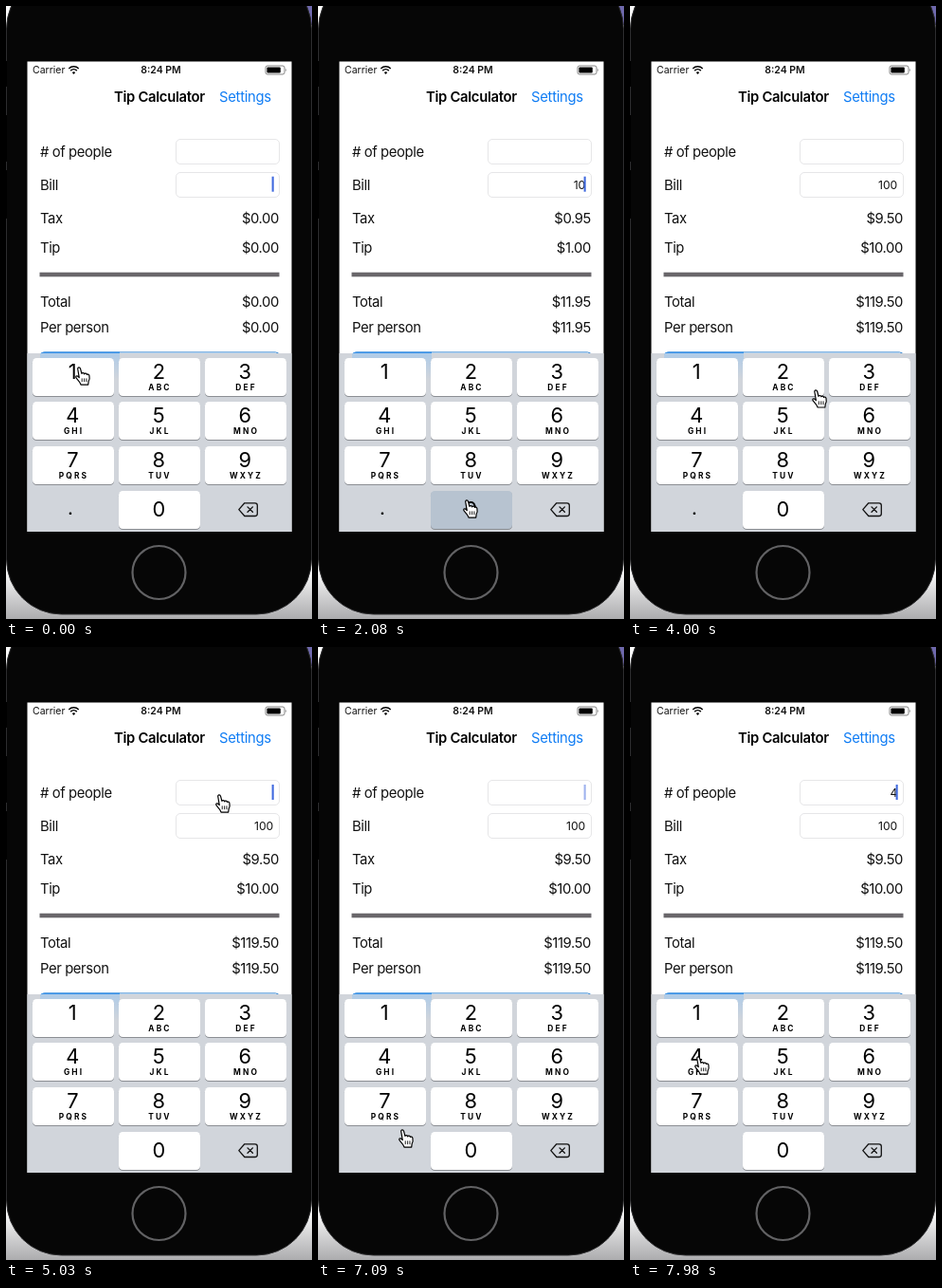
These frames come from a looping animation (323 px wide and 646 px high, 8 s). An HTML page:

```html
<!DOCTYPE html>
<html lang="en">
<head>
<meta charset="utf-8">
<title>Tip Calculator</title>
<style>
  html, body { margin: 0; width: 100%; height: 100%; overflow: hidden; background: #d2d2d4; }
  svg { display: block; width: 323px; height: 646px; font-family: Inter, Roboto, sans-serif; }
  .label { font-size: 14.8px; letter-spacing: -.026em; fill: #111; }
  .title { font-weight: 600; letter-spacing: -.02em; fill: #000; }
  .link { letter-spacing: -.018em; fill: #0f7cf4; }
  .status { font-size: 10.5px; fill: #111; }
  .field { fill: #fff; stroke: #e6e6e8; }
  .input { font-size: 12.2px; fill: #111; }
  .digit { font-size: 21.8px; fill: #000; }
  .letters { font-size: 8.4px; font-weight: 700; letter-spacing: 2.1px; fill: #000; }
  .end { text-anchor: end; }
  .mid { text-anchor: middle; }
</style>
</head>
<body>
<svg viewBox="0 0 323 646">
  <defs>
    <linearGradient id="floor" gradientUnits="userSpaceOnUse" x1="0" y1="595" x2="0" y2="646">
      <stop offset="0" stop-color="#fafafa"/>
      <stop offset="1" stop-color="#acacae"/>
    </linearGradient>
    <linearGradient id="tint" x1="0" y1="0" x2="0" y2="1">
      <stop offset="0" stop-color="#aecbe8"/>
      <stop offset="1" stop-color="#d1d5db"/>
    </linearGradient>
  </defs>
  <rect width="323" height="646" fill="url(#floor)"/>
  <rect x="300" width="23" height="20" fill="#6f69ad"/>
  <rect x=".5" y="-34" width="322" height="675" rx="58" fill="#060606" stroke="#2d2d2f"/>
  <path d="M.5 58V85M.5 115V164M.5 173V224" stroke="#000"/>
  <circle cx="161.5" cy="597" r="28" fill="none" stroke="#626264" stroke-width="2.2"/>
  <rect x="22.5" y="58.5" width="279" height="495.5" fill="#fff"/>

  <text class="status" x="28" y="71">Carrier</text>
  <path d="M66.3 66a7.4 7.4 0 0 1 10.4 0M68.2 68.1a4.7 4.7 0 0 1 6.6 0" fill="none" stroke="#000" stroke-width="1.5"/>
  <path d="M71.5 72l-1.7-1.9a2.4 2.4 0 0 1 3.4 0z"/>
  <text class="status mid" x="163.5" y="71" font-weight="600">8:24 PM</text>
  <rect x="274" y="63" width="20" height="9" rx="2" fill="none" stroke="#777" stroke-width=".9"/>
  <rect x="275.4" y="64.4" width="14.4" height="6.2" rx="1"/>
  <path d="M295.2 65.8q1.6 1.7 0 3.4z" fill="#777"/>

  <text class="label title" x="114" y="100.5">Tip Calculator</text>
  <text class="label link" x="225" y="100.5">Settings</text>
  <rect class="field" x="179.5" y="140.5" width="109" height="26" rx="4.5"/>
  <rect class="field" x="179.5" y="175.5" width="109" height="26" rx="4.5"/>
  <rect x="35.5" y="280.7" width="253" height="4.6" fill="#69666a"/>
  <rect x="36.5" y="364.9" width="252" height="12" rx="4" fill="#fff" stroke="#3586d2"/>
  <path d="M120 364.4V376H36V368.5Q36 364.4 40.5 364.4z" fill="#3f95e8"/>

  <g id="rows"></g>
  <rect x="22.5" y="366" width="279" height="188" fill="#d1d5db"/>
  <rect x="36" y="366" width="84" height="28" fill="url(#tint)"/>
  <g id="keys"></g>
  <rect id="dot" x="66.8" y="533.6" width="2.3" height="2.4" rx=".6"/>
  <g fill="none" stroke="#111" stroke-width="1.3" stroke-linejoin="round" stroke-linecap="round">
    <path d="M251.8 523.8H262.8Q265.3 523.8 265.3 526.3V535Q265.3 537.5 262.8 537.5H251.8L245.8 530.6z"/>
    <path d="M255 527.9l5.4 5.4m0-5.4l-5.4 5.4"/>
  </g>
  <rect id="caret" x="280.6" width="2.1" height="16" fill="#426bdf"/>
  <g id="hand">
    <path d="M-4.8-6.8C-5-8.6-2.7-8.8-2.2-7L-1-2.4C-.6-3.5 1.3-3.4 1.5-2 2-3 3.8-2.8 4-1.4 4.6-2.1 6-1.8 6.3-.4 6.8 2 6.6 3.5 5.6 5L5.2 8.2H-1.8C-2.4 6-4.4 4-5.8 2.4-7.4.6-6.4-.6-5 0L-3.4 1.4z"
      fill="#fff" stroke="#000" stroke-width="1.1" stroke-linejoin="round"/>
    <path d="M-.7 2.2V5.6M1.5 2.2V5.6M3.6 2.2V5.6" stroke="#000" stroke-width=".8"/>
  </g>
</svg>
<script>
const LOOP = 8000, BEAT = 147.7; // the screen refreshes once per beat
const $ = id => document.getElementById(id);
const clamp = v => Math.min(1, Math.max(0, v));
const ease = u => u * u * (3 - 2 * u);
const money = v => '$' + (Math.round(v * 100 + 1e-6) / 100).toFixed(2);

function add(parent, tag, attrs, text = '') {
  const el = document.createElementNS('http://www.w3.org/2000/svg', tag);
  for (const k in attrs) el.setAttribute(k, attrs[k]);
  el.textContent = text;
  return parent.appendChild(el);
}

function addRow(label, y, input) {
  add($('rows'), 'text', { class: 'label', x: 36, y }, label);
  return add($('rows'), 'text', input
    ? { class: 'input end', x: 282.3, y: y - 1 }
    : { class: 'label end', x: 288, y });
}
const people = addRow('# of people', 159, true);
const bill = addRow('Bill', 193.5, true);
const tax = addRow('Tax', 229);
const tip = addRow('Tip', 259.5);
const total = addRow('Total', 317);
const share = addRow('Per person', 343.5);

const letters = ' , ,ABC,DEF,GHI,JKL,MNO,PQRS,TUV,WXYZ'.split(',');
const keys = letters.map((word, n) => {
  const col = n ? (n - 1) % 3 : 1, row = n ? Math.floor((n - 1) / 3) : 3;
  const x = Math.round(27.6 + 91.3 * col), y = Math.round(370.6 + 46.7 * row);
  const box = { x, width: 86, height: 40, rx: 4.3 };
  add($('keys'), 'rect', { ...box, y: y + 1, fill: '#8b8e93' });
  const face = add($('keys'), 'rect', { ...box, y });
  add($('keys'), 'text', { class: 'digit mid', x: x + 42.3, y: y + (n ? 21.8 : 27.3) }, n);
  add($('keys'), 'text', { class: 'letters mid', x: x + 43.5, y: y + 34 }, word);
  return face;
});

// All times below are in beats.
const FOCUS = 34; // the people field takes over the input
const taps = [
  { key: 1, down: 2, up: 2 }, { key: 0, down: 10, up: 11 },
  { key: 0, down: 14, up: 15 }, { key: 4, down: 53, up: 54 }
];
const moves = [
  { from: 3, to: 7, x: 161, y: 530 },
  { from: 17, to: 21, x: 174, y: 309 },
  { from: 21, to: 25, x: 190, y: 506 },
  { from: 25, to: 31, x: 229, y: 151 },
  { from: 31, to: 32, x: 229, y: 165 },
  { from: 43, to: 48, x: 93, y: 518 },
  { from: 48, to: 51, x: 76, y: 441 }
];

function handAt(b) {
  let x = 81, y = 390;
  for (const m of moves) {
    const u = ease(clamp((b - m.from) / (m.to - m.from)));
    x += (m.x - x) * u;
    y += (m.y - y) * u;
  }
  return `translate(${x} ${y}) scale(1.1)`;
}

// Solid after a touch, then a seven-beat blink with soft edges.
function caretAt(b) {
  const touch = Math.max(-1, ...[FOCUS, ...taps.map(p => p.down)].filter(s => s <= b));
  const age = b - touch, gap = Math.abs(age % 7 - 5.5);
  return age ? clamp(Math.min(gap, 7 - gap) - 1) : 1;
}

const typed = (b, inPeople) => taps
  .filter(p => p.up <= b && (p.up > FOCUS) === inPeople).map(p => p.key).join('');

function draw(b) {
  const amount = typed(b, false), n = Number(amount);
  people.textContent = typed(b, true);
  bill.textContent = amount;
  tax.textContent = money(n * .095);
  tip.textContent = money(n * .1);
  total.textContent = share.textContent = money(n * 1.195);
  keys.forEach((face, k) => {
    const down = taps.some(p => p.key === k && p.down <= b && b < p.up);
    face.setAttribute('fill', down ? '#b7c3d0' : '#fff');
  });
  $('dot').setAttribute('visibility', b < FOCUS ? 'visible' : 'hidden');
  $('caret').setAttribute('y', b < FOCUS ? 179.7 : 145);
  $('caret').setAttribute('opacity', caretAt(b));
  $('hand').setAttribute('transform', handAt(b));
}

const start = performance.now();
function tick() {
  draw(Math.floor((performance.now() - start) % LOOP / BEAT));
  requestAnimationFrame(tick);
}
tick();
</script>
</body>
</html>
```
